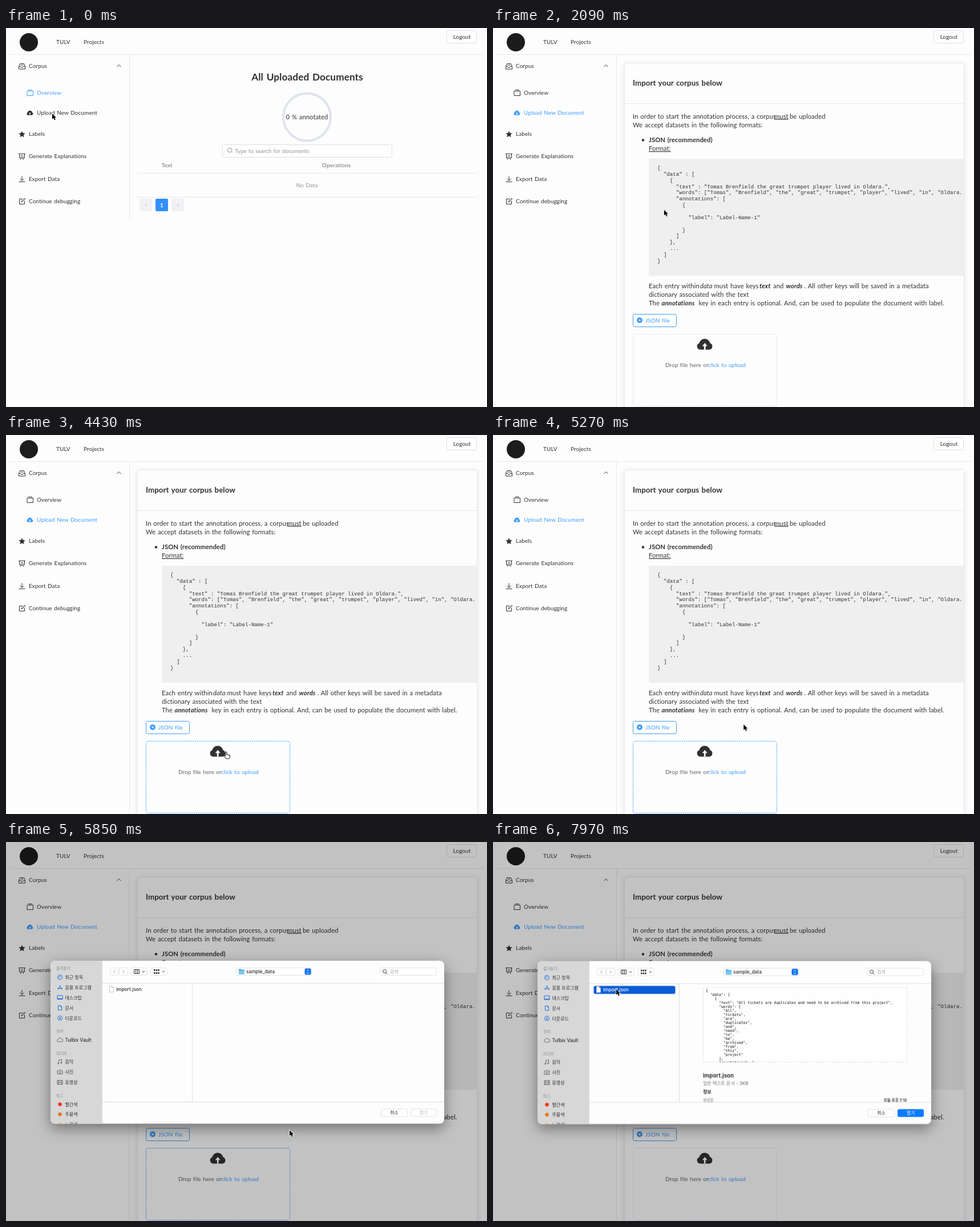
An HTML page for the animation above (8 s loop, 843 by 664 pixels).

```html
<!DOCTYPE html>
<html lang="en">
<head>
<meta charset="utf-8">
<title>Corpus upload</title>
<style>
html, body { margin: 0; width: 100%; height: 100%; overflow: hidden; background: #fdfdfd; }
svg { display: block; width: 843px; height: 664px; }
text { font: 10px Lato, sans-serif; fill: currentColor; word-spacing: .08em; letter-spacing: .006em; }
svg { color: #303133; }
.body text { font-size: 11.25px; }
.bold { font-weight: 700; }
.em { font-weight: 700; font-style: italic; }
.u { text-decoration: underline; }
.mid { text-anchor: middle; }
.end { text-anchor: end; }
.blue { color: #409eff; }
.gray { color: #909399; }
.line { fill: none; stroke: currentColor; stroke-width: 1; }
.rule { fill: none; stroke: #e6e8e6; }
.box { fill: #fefefe; stroke: #dcdfe6; }
#code text { font: 9.1px "Liberation Mono", monospace; word-spacing: 0; letter-spacing: 0; }
#sheet text { font: 500 8.3px Inter, "Noto Sans CJK KR", "Noto Sans CJK", sans-serif; word-spacing: 0; letter-spacing: 0; }
#sheet .ko { font-size: 8px; }
#sheet .cap { font-size: 6.7px; }
#sheet .name { font-size: 9.6px; font-weight: 700; }
#sheet .bold { font-weight: 700; }
#preview #listing text { font: 6.4px "DejaVu Sans Mono", monospace; }
.panel { filter: drop-shadow(0 8px 12px rgba(0, 0, 0, .42)); }
.card { filter: drop-shadow(0 1px 4px rgba(0, 0, 0, .1)); }
</style>
</head>
<body>
<svg viewBox="0 0 843 664">
  <defs>
    <g id="upload">
      <path fill="currentColor" d="M-9 10a6.5 6.5 0 0 1-2-12.5a11 11 0 0 1 21.5 0a6.5 6.5 0 0 1-1.5 12.5z"/>
      <path fill="#fdfdfd" d="M0-3l-5 6h3.5v7h3v-7H5z"/>
    </g>
    <path id="down" class="line" d="M-2.2-1l2.2 2.2 2.2-2.2"/>
    <clipPath id="frame"><rect x="78" y="208" width="690" height="285.5" rx="8"/></clipPath>
    <clipPath id="paper"><rect x="368" y="255" width="358" height="130"/></clipPath>
    <clipPath id="column"><rect x="327" y="248" width="441" height="207"/></clipPath>
  </defs>
  <rect width="843" height="664" fill="#fdfdfd"/>

  <!-- header -->
  <circle cx="40" cy="25" r="16" fill="#1c1c1c"/>
  <text x="88" y="28">TULV</text>
  <text x="136" y="28">Projects</text>
  <rect class="box" x="772.5" y="4.5" width="52" height="22" rx="3"/>
  <text class="mid" x="799" y="19">Logout</text>
  <path class="rule" d="M7 46.5H838M216.5 47V336"/>

  <!-- menu -->
  <rect id="hover" x="6" y="131.5" width="210" height="35" fill="#e6f0f9"/>
  <g class="line">
    <path d="M22.5 67.5v4.5h11v-4.5h-3.2l-1 1.7h-2.6l-1-1.7zM22.5 67.5l2-5h7l2 5M25.5 65h5"/>
    <path d="M194.5 68l3.5-3.5 3.5 3.5"/>
    <path d="M23.5 220.5h9v7h-9zM22 220.5h12M25 231l2-3.5h2l2 3.5M26 225.5v-2M28 225.5v-3M30 225.5v-2"/>
    <path d="M28 259.5v8M24.5 264l3.5 3.5 3.5-3.5M22.5 269.5h11"/>
    <path d="M29 299.5h-5.5v9h9v-5.5M27 305l.5-2 5-5 1.3 1.3-5 5z"/>
  </g>
  <path fill="currentColor" d="M28 180.5l1.7 3.6 3.9.5-2.9 2.7.8 3.9-3.5-1.9-3.5 1.9.8-3.9-2.9-2.7 3.9-.5z"/>
  <text x="40" y="70">Corpus</text>
  <g id="navOverview">
    <path class="line" d="M37 110.5h10.5v8h-10.5zM38.5 108.5h7.5"/>
    <text x="54" y="117">Overview</text>
  </g>
  <g id="navUpload">
    <use href="#upload" transform="translate(42 149) scale(.37)"/>
    <text x="54" y="152">Upload New Document</text>
  </g>
  <text x="40" y="189">Labels</text>
  <text x="40" y="228">Generate Explanations</text>
  <text x="40" y="268">Export Data</text>
  <text x="40" y="307">Continue debugging</text>

  <!-- document list -->
  <g id="overview">
    <text class="bold mid" x="528" y="92" style="font-size:17.2px">All Uploaded Documents</text>
    <circle cx="527.5" cy="156" r="41.5" fill="none" stroke="#dfe3ee" stroke-width="4"/>
    <text class="mid" x="527.5" y="160" style="font-size:11.2px">0 % annotated</text>
    <rect class="box" x="379.5" y="204.5" width="297" height="22" rx="3"/>
    <g class="gray">
      <path class="line" d="M395.5 217l1.5 1.5M388.5 214a3.8 3.8 0 1 0 7.6 0a3.8 3.8 0 1 0-7.6 0"/>
      <text x="401" y="219" style="font-size:9.7px">Type to search for documents</text>
      <text class="bold mid" x="282" y="243.5">Text</text>
      <text class="bold mid" x="579" y="243.5">Operations</text>
      <text class="mid" x="527.5" y="278.5">No Data</text>
    </g>
    <path class="rule" d="M230 254.5H826M230 296.5H826"/>
    <g fill="#f1f1f4">
      <rect x="234" y="299" width="22" height="22" rx="2"/>
      <rect x="290" y="299" width="22" height="22" rx="2"/>
      <rect x="262" y="299" width="22" height="22" rx="2" fill="#3391fb"/>
    </g>
    <path class="line" d="M246.5 307.5l-2.5 2.5 2.5 2.5M300 307.5l2.5 2.5-2.5 2.5" style="color:#b8bcc4"/>
    <text class="bold mid" x="273" y="313.5" style="color:#fff">1</text>
  </g>

  <!-- import page -->
  <g id="import" class="body">
    <path class="rule" d="M216.5 336V664"/>
    <rect class="card" x="230.5" y="61.5" width="595" height="640" rx="3" fill="#fdfdfd" stroke="#e8ebf2"/>
    <path class="rule" d="M231 132.5H825"/>
    <text class="bold" x="245" y="101" style="font-size:13.3px">Import your corpus below</text>
    <text x="245" y="158.5">In order to start the annotation process, a corpus <tspan class="u" x="493">must</tspan><tspan x="520">be uploaded</tspan></text>
    <text x="245" y="174">We accept datasets in the following formats:</text>
    <circle cx="263" cy="196.5" r="2.2" fill="currentColor"/>
    <text class="bold" x="273" y="200">JSON (recommended)</text>
    <text class="u" x="273" y="215">Format:</text>
    <rect x="273" y="229" width="552" height="205" fill="#efefef"/>
    <g id="code"></g>
    <text y="455.5"><tspan x="273">Each entry within</tspan><tspan x="363" font-style="italic">data</tspan><tspan x="387.5">must have keys</tspan><tspan x="467" class="em">text</tspan><tspan x="491">and</tspan><tspan x="513.5" class="em">words</tspan><tspan x="545.5">. All other keys will be saved in a metadata</tspan></text>
    <text x="273" y="471">dictionary associated with the text</text>
    <text y="486"><tspan x="273">The</tspan><tspan x="295.5" class="em">annotations</tspan><tspan x="360.5">key in each entry is optional. And, can be used to populate the document with label.</tspan></text>
    <g class="blue">
      <rect x="245.5" y="501.5" width="76" height="22" rx="3" fill="#fefefe" stroke="currentColor"/>
      <circle cx="257" cy="512" r="3.3" fill="#fff" stroke="currentColor" stroke-width="3.4"/>
      <text x="267" y="515.5" style="font-size:10px">JSON file</text>
    </g>
    <rect id="drop" x="245.5" y="536.5" width="252" height="126" rx="4" fill="none" stroke-dasharray="2.2 1.5"/>
    <use href="#upload" transform="translate(371.2 554.5) scale(.9)"/>
    <text x="302" y="593.5" style="font-size:10px;color:#606266">Drop file here or <tspan x="377" fill="#409eff">click to upload</tspan></text>
  </g>

  <rect id="dim" width="843" height="664" fill="#000"/>

  <!-- file chooser -->
  <g id="sheet">
    <rect class="panel" x="78" y="208" width="690" height="285.5" rx="8" fill="#fdfdfd"/>
    <g clip-path="url(#frame)">
      <rect x="78" y="208" width="91" height="286" fill="#d7d7d7"/>
      <path class="rule" d="M169 247.5H768M326.5 248V455M169 455.5H768" style="stroke:#dedede"/>
      <g id="places"></g>
    </g>
    <g fill="#fefefe" stroke="#e4e4e4">
      <rect x="182.5" y="220.5" width="15" height="13" rx="3"/>
      <rect x="198.5" y="220.5" width="15" height="13" rx="3"/>
      <rect x="218.5" y="220.5" width="29" height="13" rx="3"/>
      <rect x="253.5" y="220.5" width="29" height="13" rx="3"/>
      <rect x="403.5" y="220.5" width="132" height="13" rx="3"/>
      <rect x="655.5" y="220.5" width="99" height="13" rx="3"/>
      <rect x="657.5" y="467.5" width="46" height="13.5" rx="3"/>
      <rect x="709.5" y="467.5" width="45" height="13.5" rx="3"/>
    </g>
    <path class="line" d="M191.5 224l-3 3 3 3M204.5 224l3 3-3 3" style="color:#aaa"/>
    <path class="line" d="M224.5 223.5h9v7h-9zM227.5 223.5v7M230.5 223.5v7"/>
    <path d="M259 224.5h10M259 229.5h10" stroke="#444" stroke-width="3" stroke-dasharray="2.6 1"/>
    <use href="#down" x="241" y="227"/><use href="#down" x="276" y="227"/>
    <path fill="#4aa9e3" d="M408 222.5h4l1 1.3h5v8h-10z"/>
    <path fill="#7cc8f2" d="M408 225.5h10v6.3h-10z"/>
    <text x="421" y="230">sample_data</text>
    <rect x="523.5" y="221.5" width="11" height="11" rx="2.5" fill="#0a72f5"/>
    <path class="line" d="M526.8 226l2.2-2 2.2 2M526.8 228.5l2.2 2 2.2-2" style="color:#fff"/>
    <path class="line" d="M666 229l2.5 2.5M660.5 226.5a3 3 0 1 0 6 0a3 3 0 1 0-6 0"/>
    <text class="ko" x="673" y="230" style="color:#aaa">검색</text>
    <text class="ko mid" x="680.5" y="477">취소</text>
    <text class="ko mid" x="732" y="477" style="color:#bbb">열기</text>
    <g id="file">
      <rect id="row" x="176.5" y="251.5" width="143" height="14" rx="3" fill="#0a5bd8"/>
      <path d="M181.5 252.5h4.5l2.5 2.5v8h-7zM186 252.5v2.5h2.5" fill="#fff" stroke="#bbb" stroke-width=".8"/>
      <text x="193" y="261">import.json</text>
    </g>
    <g id="preview">
      <rect x="709" y="467.5" width="46" height="13.5" rx="3" fill="#0a7aff"/>
      <text class="ko mid" x="732" y="477" style="color:#fff">열기</text>
      <rect x="368.5" y="254.5" width="357" height="130.5" fill="#fefefe" stroke="#e4e4e6" stroke-dasharray="3 1"/>
      <g id="listing" clip-path="url(#paper)" style="color:#000"></g>
      <g clip-path="url(#column)">
        <text class="name" x="368" y="412">import.json</text>
        <text class="ko" x="368" y="424.5" style="color:#777">일반 텍스트 문서 - 3KB</text>
        <text class="ko bold" x="368" y="439.5">정보</text>
        <text class="cap" x="368" y="453.5" style="color:#777">생성일</text>
        <text class="cap bold end" x="725.5" y="453.5">오늘 오후 7:12</text>
      </g>
    </g>
  </g>

  <g id="pointer">
    <path id="arrow" d="M0 0v9.8l2.3-2 1.6 3.7 1.8-.8-1.6-3.5h3.1z" stroke="#fff" stroke-width="1.4" paint-order="stroke"/>
    <path id="hand" d="M-1 0c0-1.6 2-1.6 2 0v4l5.5 1v3.2l-1.5 2.8h-5.5l-3-4.2 1-1.2 1.5 1.2z" fill="#fff" stroke="#000" stroke-width=".9"/>
  </g>
</svg>
<script>
const LOOP = 8000;
const DARK = '#303133', BLUE = '#409eff';
const byId = id => document.getElementById(id);

// Each line is [column, text]; columns are character widths.
const typeset = (id, x, y, charWidth, lineHeight, lines) => {
  byId(id).innerHTML = lines.map(([col, s], i) =>
    `<text x="${x + col * charWidth}" y="${y + i * lineHeight}">${s}</text>`).join('');
};

typeset('code', 288, 248, 5.46, 10.85, [
  [0, '{'], [2, '"data" : ['], [4, '{'],
  [6, '"text" : "Tomas Brenfield the great trumpet player lived in Oldara.",'],
  [6, '"words": ["Tomas", "Brenfield", "the", "great", "trumpet", "player", "lived", "in", "Oldara.'],
  [6, '"annotations": ['], [8, '{'], [0, ''], [10, '"label": "Label-Name-1"'], [0, ''],
  [8, '}'], [6, ']'], [4, '},'], [4, '...'], [2, ']'], [0, '}']
]);

const sentence = 'All tickets are duplicates and need to be archived from this project';
const words = sentence.split(' ');
typeset('listing', 373, 261.6, 3.853, 7.03, [
  [0, '{'], [2, '"data": ['], [4, '{'], [6, `"text": "${sentence}",`], [6, '"words": ['],
  ...words.map((w, i) => [8, `"${w}"${i < words.length - 1 ? ',' : ''}`]),
  [6, '],'], [6, '"annotations": [']
]);

// Glyphs are centred on the origin.
const glyphs = {
  clock: 'M-4 0a4 4 0 1 0 8 0a4 4 0 1 0-8 0M0-2.5V0H-2',
  apps: 'M-3.5 3.5L.5-4M3.5 3.5L-.5-4M-4.5 1.5h9',
  desk: 'M-4.5-3.5h9v6.5h-9zM-4.5 1.8h9',
  page: 'M-3-4h4l2 2v6h-6zM1-4v2h2',
  down: 'M-4 0a4 4 0 1 0 8 0a4 4 0 1 0-8 0M0-2.3v4M-1.6.3L0 2l1.6-1.7',
  remote: 'M-3 3a2.3 2.3 0 0 1 0-4.5a3.2 3.2 0 0 1 6-.3a2.4 2.4 0 0 1 0 4.8z',
  note: 'M-2 3V-3l5-1v6M-2 3a1 1 0 1 1-1-1h1M3 2a1 1 0 1 1-1-1h1',
  photo: 'M-4.5-2.5h2l1-1h3l1 1h2v6h-9zM-1.7.3a1.7 1.7 0 1 0 3.4 0a1.7 1.7 0 1 0-3.4 0',
  film: 'M-4.5-3.5h9v7h-9zM-2.5-3.5v7M2.5-3.5v7M-2.5 0h5'
};
const places = [
  [221.5, '즐겨찾기'], [237, '최근 항목', 'clock'], [255, '응용 프로그램', 'apps'],
  [272.5, '데스크탑', 'desk'], [290.5, '문서', 'page'], [308.5, '다운로드', 'down'],
  [331.5, '위치'], [347, 'Tulbix Vault', 'remote'],
  [370, '미디어'], [385, '음악', 'note'], [403, '사진', 'photo'], [421, '동영상', 'film'],
  [444, '태그'], [459.5, '빨간색', '#fb2b20'], [477, '주황색', '#dd7a0c'], [495, '노란색', '#e8b820']
];
byId('places').innerHTML = places.map(([y, label, mark]) => {
  if (!mark) return `<text class="cap" x="88" y="${y + 2.5}" style="color:#888">${label}</text>`;
  const color = y < 320 ? '#1b6fe0' : '#666';
  const icon = glyphs[mark]
    ? `<path class="line" style="color:${color}" transform="translate(94.5 ${y})" d="${glyphs[mark]}"/>`
    : `<circle cx="94.5" cy="${y}" r="3.2" fill="${mark}"/>`;
  const kind = mark === 'remote' ? '' : 'ko';
  return `${icon}<text class="${kind}" x="103.5" y="${y + 3}">${label}</text>`;
}).join('');

// Steps are [time in ms, value]; the last value holds until the loop restarts.
const play = (id, prop, steps, easing = 'linear') => {
  const all = [...steps, [LOOP, steps[steps.length - 1][1]]];
  byId(id).animate(
    all.map(([t, v]) => ({ offset: t / LOOP, [prop]: v, easing })),
    { duration: LOOP, iterations: Infinity });
};
const cut = (id, prop, steps) => play(id, prop, steps, 'step-end');
const at = (x, y) => `translate(${x}px, ${y}px)`;

cut('overview', 'opacity', [[0, 1], [1000, 0]]);
cut('import', 'opacity', [[0, 0], [1000, 1]]);
play('hover', 'opacity', [[0, 0], [40, 0], [280, 1], [1500, 1], [1700, 0]]);
play('navOverview', 'color', [[0, BLUE], [1300, BLUE], [1480, DARK]]);
play('navUpload', 'color', [[0, DARK], [1300, DARK], [1480, BLUE]]);
cut('drop', 'stroke', [[0, '#dcdfea'], [3780, BLUE], [6500, '#dcdfea']]);

play('dim', 'opacity', [[0, 0], [5330, 0], [5430, .1], [5600, .195], [5850, .235]]);
play('sheet', 'opacity', [[0, 0], [5330, 0], [5430, .85], [5510, 1]]);
play('sheet', 'transform', [[0, at(0, -24)], [5330, at(0, -24)], [5430, at(0, -14)],
  [5600, at(0, -4)], [5850, at(0, 0)], [6100, at(0, .6)]]);
cut('row', 'opacity', [[0, 0], [7000, 1]]);
cut('file', 'color', [[0, DARK], [7000, '#fff']]);
cut('preview', 'opacity', [[0, 0], [7230, 1]]);

play('pointer', 'transform', [[0, at(81, 150)], [250, at(79, 151)], [1450, at(79, 151)],
  [2700, at(502, 472)], [3200, at(502, 472)], [3950, at(386, 556)], [4850, at(386, 556)],
  [5430, at(449, 498)], [5850, at(497, 505)], [6850, at(216, 258)]], 'ease-in-out');
const hand = [[0, 0], [60, 1], [1700, 0], [3780, 1], [5150, 0]];
cut('hand', 'opacity', hand);
cut('arrow', 'opacity', hand.map(([t, v]) => [t, 1 - v]));
</script>
</body>
</html>
```
